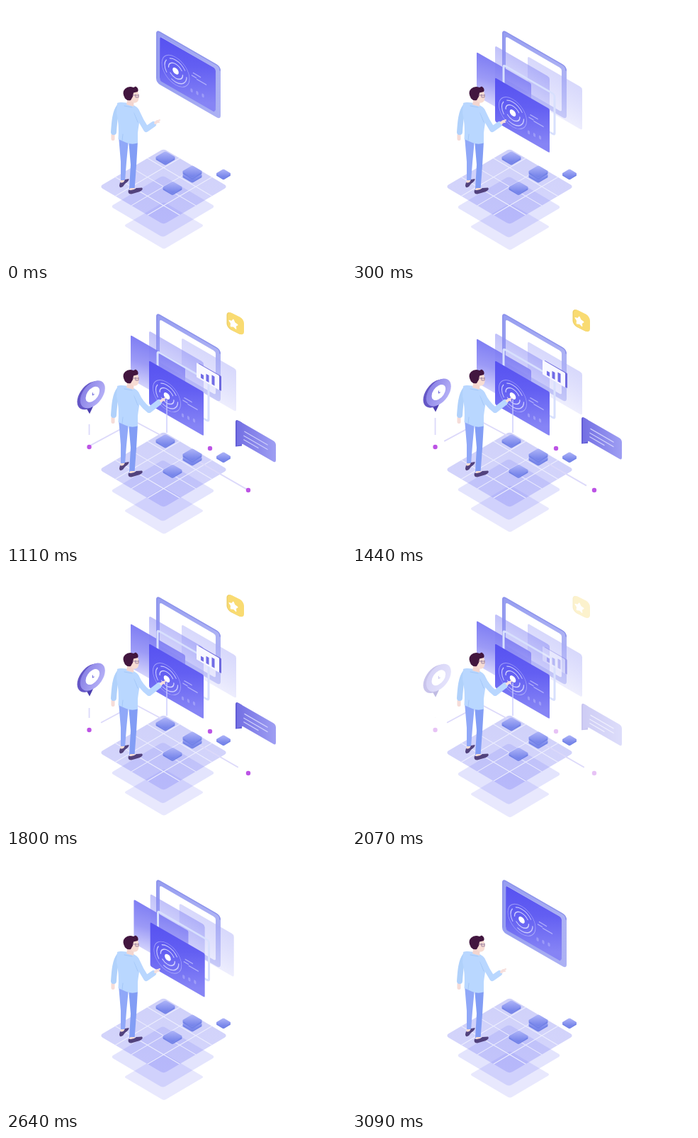
Write an HTML page that moves like this. It is 480 by 360 pixels and loops after 3.12 s.

```html
<!DOCTYPE html>
<html lang="en">
<head>
<meta charset="utf-8">
<title>Isometric dashboard</title>
<style>
html, body { margin: 0; width: 100%; height: 100%; overflow: hidden; background: #fff; }
svg { display: block; width: 480px; height: 360px; }
.line { fill: none; stroke: #dcd9fa; stroke-width: 1.8; }
.round { fill: none; stroke-linecap: round; stroke-linejoin: round; }
</style>
</head>
<body>
<svg viewBox="0 0 480 360">
  <defs>
    <linearGradient id="rim"><stop stop-color="#969df0"/><stop offset="1" stop-color="#adb2f4"/></linearGradient>
    <linearGradient id="screenFill" x2="1" y2="1"><stop stop-color="#8584f5"/><stop offset=".5" stop-color="#6a64ef"/><stop offset="1" stop-color="#8c8bf5"/></linearGradient>
    <linearGradient id="frontFill" x2=".7" y2="1"><stop stop-color="#5651f1"/><stop offset=".45" stop-color="#635ff2"/><stop offset="1" stop-color="#8684f5"/></linearGradient>
    <linearGradient id="leftFill" x2=".35" y2="1"><stop stop-color="#706ff2"/><stop offset=".5" stop-color="#918ff5"/><stop offset="1" stop-color="#d3d3fc"/></linearGradient>
    <linearGradient id="backFill" x2="0" y2="1"><stop stop-color="#8c8df5" stop-opacity=".54"/><stop offset="1" stop-color="#b9baf9" stop-opacity=".4"/></linearGradient>
    <linearGradient id="rightFill" x2="0" y2="1"><stop stop-color="#a9abf8" stop-opacity=".46"/><stop offset="1" stop-color="#dfdffc" stop-opacity=".55"/></linearGradient>
    <linearGradient id="floorFill" x2="1" y2="1"><stop stop-color="#7478ee" stop-opacity=".34"/><stop offset="1" stop-color="#8b8df8" stop-opacity=".36"/></linearGradient>
    <linearGradient id="cardFill" x2="1" y2="1"><stop stop-color="#b0b6f9"/><stop offset="1" stop-color="#707fe8"/></linearGradient>
    <linearGradient id="pinFill" y2=".6"><stop stop-color="#837ae3"/><stop offset="1" stop-color="#b3aef6"/></linearGradient>
    <linearGradient id="chatFill"><stop stop-color="#736fe3"/><stop offset="1" stop-color="#9f9ff3"/></linearGradient>
  </defs>

  <g id="lowest"></g>
  <g id="middle"></g>
  <g id="floor"></g>
  <path class="line" id="leftLink" pathLength="1" d="M227 211L182 187L117 222"/>
  <path class="line" id="rightLink" pathLength="1" d="M250 231L342 284"/>
  <path class="line" id="pinLink"/>
  <g id="cards"></g>

  <path fill="url(#rim)" fill-rule="evenodd" transform="matrix(1 .577 0 1 212 33)"
    d="M6 0H85Q91 0 91 6V69Q91 75 85 75H6Q0 75 0 69V6Q0 0 6 0ZM8 7Q5 7 5 10V65Q5 68 8 68H81Q84 68 84 65V10Q84 7 81 7Z"/>
  <path class="round" stroke="#8e94ec" stroke-width="1.600" transform="matrix(1 .577 0 1 212 33)" d="M1 68V6Q1 1 6 1H85Q90 1 90 6"/>
  <rect id="screen" width="79" height="61" rx="3" fill="url(#screenFill)" transform="matrix(1 .577 0 1 217 43)"/>

  <g id="right"><rect width="77" height="60" rx="3" fill="url(#rightFill)"/></g>
  <g id="back"><rect width="77" height="62" rx="3" fill="url(#backFill)"/></g>
  <g id="left"><rect width="77" height="62" rx="2" fill="url(#leftFill)" opacity=".9"/></g>
  <g id="frame"><rect x="1.5" y="1.5" width="72" height="57" rx="3" fill="none" stroke="#d8e0fd" stroke-width="3"/></g>
  <g id="front">
    <rect width="77" height="62" rx="2" fill="url(#frontFill)"/>
    <g id="content" class="round" stroke="#dcdcff">
      <circle cx="25" cy="35.6" r="19.5" stroke-width=".8" opacity=".5"/>
      <circle cx="25" cy="35.6" r="15.5" stroke-width="1.200" opacity=".85" stroke-dasharray="30 9 18 7 24 9.4"/>
      <circle cx="25" cy="35.6" r="10" stroke-width="1.300" opacity=".9" stroke-dasharray="24 7 26 6"/>
      <circle cx="25" cy="35.6" r="4.300" fill="#fff" stroke="none"/>
      <path stroke-width="1.500" opacity=".6" d="M50 24H60M48 28.500H54M55 30H68"/>
      <path stroke-width="3.200" opacity=".32" d="M47.500 49V51M55.500 48V50M63.500 47V49"/>
    </g>
  </g>
  <path id="touchLink" stroke="#c9cafd" stroke-width="1.5" fill="none"/>

  <g id="man">
    <path fill="#90a8f8" d="M159 184L173 189L170 221L168 247L162 247L162 220Z"/>
    <path fill="#829df5" d="M173 189L186 191L184 225L181.500 259L174 258L176 224Z"/>
    <path fill="#f7dcd3" d="M162 246H168L167 251H161ZM175 257H182L181 261H175Z"/>
    <path fill="#52427d" d="M161 249Q166 251 168 245L173.500 244Q174 247 168 251L165 255Q160 258 160 253ZM173 259.500Q179 261.500 184 257L192 256.500Q194.500 259 189 262L177 265.500Q171 265.500 173 259.500Z"/>
    <path class="round" stroke="#f5dcd8" stroke-width="5" d="M151 182L151 187.500"/>
    <path class="round" stroke="#b0d1fb" stroke-width="8" d="M160 142C154 150 153 163 152 178"/>
    <path fill="#b9d7ff" d="M157 137C164 134 179 138 185 143C192 151 188 163 186 179V193.500Q178 196 170 193L158.500 188Q160 167 156 151Z"/>
    <path class="round" stroke="#9fc3f6" stroke-width=".8" d="M167 141L178 143M165 181L164 190M181 151L186 164"/>
    <path fill="#f3d5cf" d="M172 130H181L180 142L170 139Z"/>
    <path fill="#f7dcd3" d="M176 121L186 120L188 128L186.500 134Q183 139 177 135Z"/>
    <path fill="#42163f" d="M168 130.500Q163 122 168 117Q173 112.500 180 115L183 113.500Q188 116 186 121L180 122.500L179 128L176 133Q171 134 168 130.500Z"/>
    <path class="round" stroke="#7b6390" stroke-width=".7" d="M179 126H187M183 125V129H187V125"/>
    <path id="arm" class="round" stroke="#b9d7ff" stroke-width="8"/>
    <path id="hand" class="round" stroke="#f6dfdc" stroke-width="4"/>
    <path id="finger" class="round" stroke="#f6dfdc" stroke-width="2"/>
  </g>

  <g id="dots" fill="#bc53e5">
    <circle cx="117.500" cy="223" r="3.200"/><circle cx="288" cy="225" r="3.200"/><circle cx="342" cy="284" r="3.200"/>
  </g>

  <g id="pin">
    <path fill="#4c3faf" d="M112 163L118 173.500L123 163Z"/>
    <g transform="matrix(1 -.5 0 1 118.500 147.500)"><circle r="18" fill="#6557c6"/></g>
    <g transform="matrix(1 -.5 0 1 122.300 146)">
      <circle r="17.500" fill="url(#pinFill)"/><circle r="9.800" fill="#fff"/>
      <path class="round" stroke="#6660d8" d="M0 -2V1H2"/>
    </g>
  </g>
  <g id="badge" >
    <g transform="matrix(1 .5 0 1 324 45)">
      <rect x="-12.500" y="-12" width="23" height="24" rx="6" fill="#edcf6a"/>
      <rect x="-11" y="-12.500" width="23" height="24" rx="6" fill="#f9db72"/>
      <path id="star" fill="#fff" stroke="#fff" stroke-width="1.600" stroke-linejoin="round"/>
    </g>
  </g>
  <g id="chart">
    <g transform="matrix(1 .577 0 1 269 100)">
      <rect x="3" y="-1" width="32" height="21" rx="1" fill="#6e69de"/>
      <rect width="32" height="20.500" rx="1" fill="#f8f8ff"/>
      <path fill="#716ce6" d="M6 12H10V18H6ZM13.500 8H17.500V18H13.500ZM21.500 5H25.500V18H21.500Z"/>
    </g>
  </g>
  <g id="chat">
    <g transform="matrix(1 .577 0 1 324 179.500)">
      <path fill="#625dd6" d="M4 0H9V33L0 39V4Q0 0 4 0Z"/>
      <path fill="url(#chatFill)" d="M5 0H53Q57 0 57 4V25.500Q57 29.500 53 29.500H10L2 37V4Q2 0 5 0Z"/>
      <path class="round" stroke="#d2d2fc" stroke-width="1.400" d="M13 10.500H45M12 17H45M12 22.500H32"/>
    </g>
  </g>
</svg>
<script>
const LOOP = 3120;
const $ = id => document.getElementById(id);
const set = (id, name, value) => $(id).setAttribute(name, value);
const mix = (a, b, p) => a + (b - a) * p;
const ease = p => p * p * (3 - 2 * p);

// Eased value of a track of [time, value] pairs.
function track(t, keys) {
  if (t <= keys[0][0]) return keys[0][1];
  for (let i = 1; i < keys.length; i++) {
    const [t0, a] = keys[i - 1], [t1, b] = keys[i];
    if (t < t1) return mix(a, b, ease((t - t0) / (t1 - t0)));
  }
  return keys[keys.length - 1][1];
}

// Isometric square with rounded corners, 178 pixels wide at scale 1.
function slab(cx, cy, scale, fill, radius = 5) {
  const m = [.89 * scale, .525 * scale, -.89 * scale, .525 * scale, cx, cy].join(" ");
  return `<rect x="-50" y="-50" width="100" height="100" rx="${radius}" fill="${fill}" transform="matrix(${m})"/>`;
}

function card(x, y, scale = .164) {
  return slab(x, y + 2.6, scale, "#6f7fe6", 12) + slab(x, y + 1.3, scale, "#7b8aea", 12) +
    slab(x, y, scale, "url(#cardFill)", 12);
}

function buildFloor() {
  let grid = "";
  for (const k of [-25, 0, 25]) grid += `M${k} -50V50M-50 ${k}H50`;
  $("lowest").innerHTML = slab(223, 310, .635, "rgba(90,95,240,.14)");
  $("middle").innerHTML = slab(221.5, 283, .83, "rgba(90,95,240,.17)");
  $("floor").innerHTML = slab(222.5, 255, 1.02, "url(#floorFill)") +
    `<path d="${grid}" stroke="#eeeffe" transform="matrix(.908 .535 -.908 .535 222.5 255)"/>`;
  $("cards").innerHTML = card(225, 213.5) + card(263, 238.5) + card(263, 233.5) +
    card(235, 256) + card(307, 236.5, .122);
}

function buildStar() {
  const points = Array.from({ length: 10 }, (_, i) => {
    const r = i % 2 ? 3.3 : 6, a = i * Math.PI / 5;
    return `${r * Math.sin(a) - 3} ${2 - r * Math.cos(a)}`;
  });
  set("star", "d", "M" + points.join("L") + "Z");
}

// Panels slide from the screen to their spread place, then float by bob.
const panels = {
  right: { to: [248, 71], bob: [[300, 0], [780, -7], [1440, 3], [1800, 3], [2330, 0]] },
  back: { to: [202, 56], bob: [[300, 0], [780, 0], [1440, 6], [1800, 6], [2330, 0]] },
  left: { to: [176, 65], bob: [[300, 0], [780, -5], [1440, 5], [1800, 8], [2330, 0]] },
  frame: { to: [212.5, 81], bob: [[300, 0], [780, 9], [1440, 1], [1800, -1], [2330, 0]] },
  front: { to: [202, 101], bob: [[0, 0]] }
};

function draw(t) {
  const sway = 1 - Math.cos(4 * Math.PI * t / LOOP);
  set("lowest", "transform", `translate(0 ${2.5 * sway})`);
  set("middle", "transform", `translate(0 ${1.5 * sway})`);

  const spread = track(t, [[0, 0], [280, 1], [2580, 1], [2880, 0]]);
  for (const [id, { to, bob }] of Object.entries(panels)) {
    const x = mix(217.5, to[0], spread), y = mix(43.5, to[1], spread) + track(t, bob);
    set(id, "transform", `matrix(1 .577 0 1 ${x} ${y})`);
    if (id !== "front") set(id, "opacity", Math.min(1, spread * 3));
  }
  set("screen", "opacity", Math.max(0, 1 - spread * 2.5));
  set("content", "transform", `translate(${-3 * (1 - spread)} 0)`);

  const reach = track(t, [[400, 0], [680, 1], [2100, 1], [2340, 0]]);
  const ex = mix(198, 202, reach), ey = mix(174, 171, reach);
  const hx = mix(211, 219, reach), hy = mix(165, 158, reach);
  set("arm", "d", `M184 148Q190 162 ${ex} ${ey}L${hx - 3} ${hy + 2}`);
  set("hand", "d", `M${hx} ${hy}L${hx + 2.5} ${hy - 2}`);
  set("finger", "d", `M${hx + 2} ${hy - 2}L${hx + 6} ${hy - 4}M${hx + 2} ${hy - 1}L${hx + 5} ${hy - 1}`);

  const touch = track(t, [[620, 0], [760, 1], [2200, 1], [2520, 0]]);
  set("touchLink", "d", `M227 156V${156 + 47 * touch}`);
  set("touchLink", "opacity", touch ? .9 : 0);

  const link = (id, start) => {
    const length = track(t, [[start, 0], [start + 200, 1], [1080, 1], [1440, .88], [1800, .845], [2180, .845], [2350, 0]]);
    set(id, "stroke-dasharray", `${length} 2`);
    set(id, "opacity", length > .001 ? 1 : 0);
  };
  link("leftLink", 570);
  link("rightLink", 760);

  const shown = track(t, [[850, 0], [1050, 1], [1950, 1], [2150, 0]]);
  const drift = track(t, [[850, 8], [1080, 4], [1440, 0], [1800, 3], [2150, 5]]);
  for (const id of ["pin", "badge", "chart", "chat"]) {
    set(id, "opacity", shown);
    set(id, "transform", `translate(0 ${id === "pin" ? drift * .7 : drift})`);
  }
  const pinTop = track(t, [[1000, 206], [1200, 180], [1440, 182], [1800, 192], [2100, 206]]);
  set("pinLink", "d", `M117.5 206V${pinTop}`);
  set("pinLink", "opacity", shown);
  set("dots", "opacity", shown);
}

buildFloor();
buildStar();

const start = performance.now();
function tick() {
  draw((performance.now() - start) % LOOP);
  requestAnimationFrame(tick);
}
draw(0);
requestAnimationFrame(tick);
</script>
</body>
</html>
```
